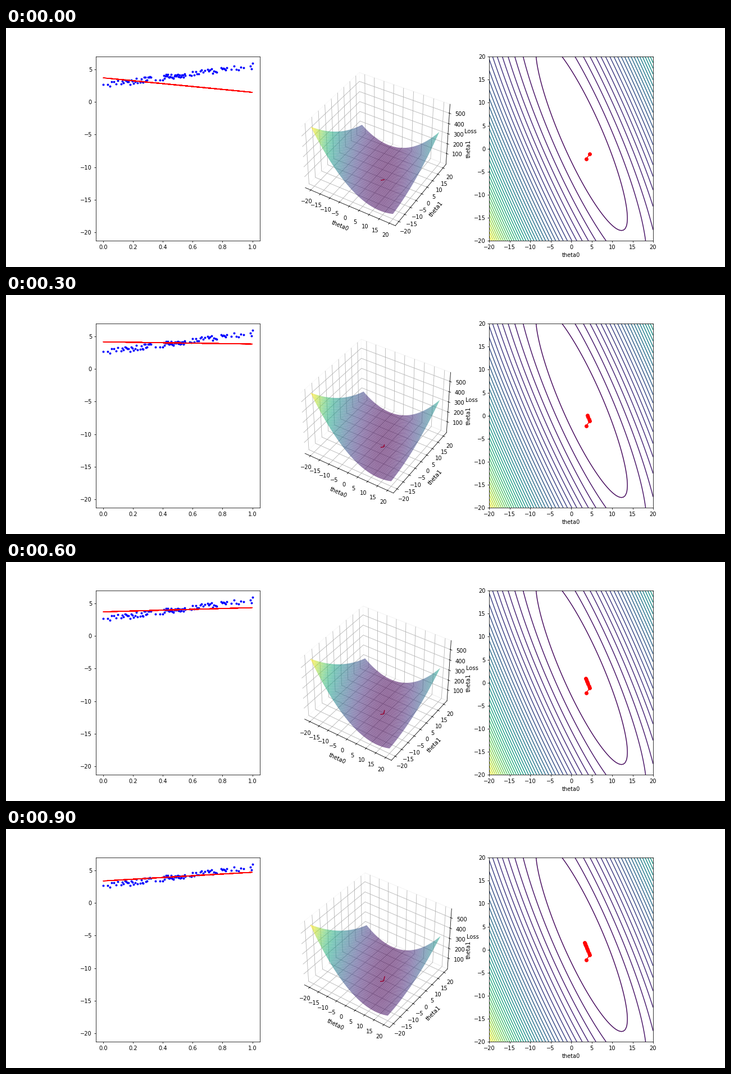
A matplotlib script for the animation above (1 s loop, 1280x427 px).

```python
import numpy as np
import matplotlib.pyplot as plt
from matplotlib.animation import FuncAnimation

FRAMES = 10
WIDTH, HEIGHT = 1280, 427
rng = np.random.default_rng(7)

# Samples of a noisy line, clustered along x as (start, end, count)
BANDS = [(0.00, 0.01, 1), (0.03, 0.10, 6), (0.12, 0.23, 14), (0.25, 0.32, 12),
         (0.35, 0.38, 2), (0.40, 0.55, 28), (0.58, 0.68, 11), (0.70, 0.76, 8),
         (0.79, 0.83, 6), (0.86, 0.94, 6), (0.985, 1.00, 3)]
x = np.concatenate([np.linspace(*band) for band in BANDS])
x = rng.permutation(x)
y = 2 + 3 * x + rng.uniform(0.1, 0.95, x.size)

# One steep step down into the valley, then a slow decay along its floor
BEST = np.array([2.55, 3.04])
START = np.array([3.68, -2.22])
VALLEY = np.array([4.54, -1.19])
decay = 0.893 ** np.arange(FRAMES)
theta = np.vstack([START, BEST + np.outer(decay, VALLEY - BEST)])


def loss(t0, t1):
    """Half mean squared error, written with the moments of x."""
    d0, d1 = t0 - BEST[0], t1 - BEST[1]
    return 0.5 * ((d0 + 0.468 * d1) ** 2 + 0.069 * d1 ** 2 + 0.08)


fig = plt.figure(figsize=(18, HEIGHT * 18 / WIDTH), dpi=WIDTH / 18)
grid = np.linspace(-20, 20, 100)
T0, T1 = np.meshgrid(grid, grid)
Z = loss(T0, T1)

ax_fit = fig.add_subplot(131)
ax_fit.plot(x, y, "b.")
fit, = ax_fit.plot(x, y, "r-")
ax_fit.set_xlim(-0.0485, 1.0495)
ax_fit.set_ylim(-21.282, 6.922)

ax_surf = fig.add_subplot(132, projection="3d")
ax_surf.plot_surface(T0, T1, Z, cmap="viridis", alpha=0.6)
trail, = ax_surf.plot(*theta[:1].T, loss(*theta[:1].T), "r-")
ax_surf.set_xlabel("theta0")
ax_surf.set_ylabel("theta1")
ax_surf.set_zlabel("Loss")
ax_surf.set_zticks(range(100, 600, 100))
for axis in (ax_surf.xaxis, ax_surf.yaxis, ax_surf.zaxis):
    axis.pane.set_fill(False)

ax_map = fig.add_subplot(133)
ax_map.contour(T0, T1, Z, 40, cmap="viridis")
steps, = ax_map.plot([], [], "ro-")
ax_map.set_xlim(-20, 20)
ax_map.set_ylim(-20, 20)
ax_map.set_xlabel("theta0")
ax_map.set_ylabel("theta1")


def update(i):
    t0, t1 = theta[i]
    fit.set_data(x, t0 + t1 * x)
    path = theta[:i + 2].T
    trail.set_data_3d(*path, loss(*path))
    steps.set_data(*path)
    ax_surf.view_init(elev=40, azim=-59 + 0.5 * i)
    return fit, trail, steps


anim = FuncAnimation(fig, update, frames=FRAMES, interval=100,
                     repeat=True, repeat_delay=0, blit=False)
plt.show()
```
